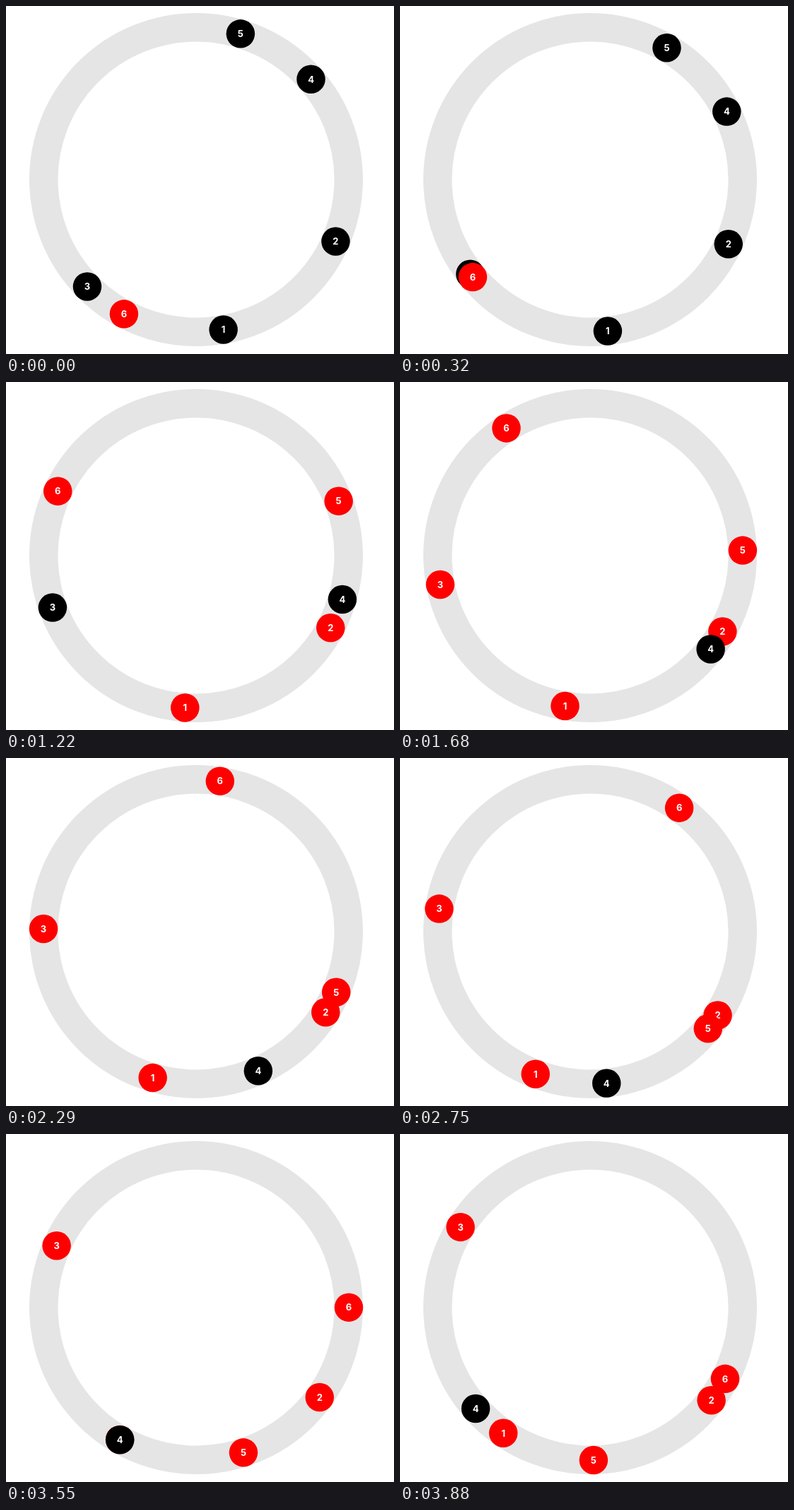
Animation of 549x493 px, one loop 3930 ms. Source, as an HTML page:

```html
<!DOCTYPE html>
<html lang="en">
<head>
<meta charset="utf-8">
<title>Runners on a ring</title>
<style>
  html, body { margin: 0; width: 100%; height: 100%; overflow: hidden; background: #fff; }
  svg { display: block; }
  text { font: bold 13px Inter, Arial, sans-serif; fill: #fff; text-anchor: middle; }
</style>
</head>
<body>
<svg id="stage" width="549" height="493" viewBox="0 0 549 493">
  <circle cx="269" cy="246" r="215.75" fill="none" stroke="#e5e5e5" stroke-width="40.5"/>
</svg>
<script>
const LOOP = 3930, TICK = 78, CX = 269, CY = 246, R = 216, GAP = 60;

// All runners start together at angle 0; speeds are degrees per race unit.
const speeds = [10, 3, 17, 40, 36, 60];

// Key points of the slightly uneven clock: milliseconds, race time.
const clock = [[0, 7.97], [620, 8.705], [1220, 9.417], [2290, 10.65], [3250, 11.719], [3880, 12.464]];

const stage = document.getElementById('stage');
const angle = (speed, time) => speed * time % 360;

// A runner turns red for good once its angle differs from all others by GAP.
function lonelyAt(speed) {
  const others = speeds.filter(s => s !== speed);
  const end = clock.at(-1)[1];
  for (let t = 0; t <= end; t += 0.005) {
    if (others.every(s => Math.abs(angle(s, t) - angle(speed, t)) >= GAP)) return t;
  }
  return Infinity;
}

function add(parent, tag, attrs = {}) {
  const el = document.createElementNS('http://www.w3.org/2000/svg', tag);
  for (const k in attrs) el.setAttribute(k, attrs[k]);
  return parent.appendChild(el);
}

const runners = speeds.map((speed, i) => {
  const g = add(stage, 'g');
  const disc = add(g, 'circle', { r: 20.25 });
  add(g, 'text', { y: 4.8 }).textContent = i + 1;
  return { g, disc, speed, redAt: lonelyAt(speed) };
});

// Race time, advancing in even ticks between key points.
function raceTime(ms) {
  const i = clock.findIndex(([t]) => t > ms);
  if (i < 0) return clock.at(-1)[1];
  const [t0, a] = clock[i - 1], [t1, b] = clock[i];
  const n = Math.round((t1 - t0) / TICK);
  return a + (b - a) * Math.floor(n * (ms - t0) / (t1 - t0)) / n;
}

function draw(ms) {
  const time = raceTime(ms);
  for (const { g, disc, speed, redAt } of runners) {
    const a = angle(speed, time) * Math.PI / 180;
    g.setAttribute('transform', `translate(${CX + R * Math.cos(a)} ${CY + R * Math.sin(a)})`);
    disc.setAttribute('fill', time >= redAt ? '#f00' : '#000');
  }
}

let start;
function frame(now) {
  start ??= now;
  draw(Math.max(0, now - start) % LOOP);
  requestAnimationFrame(frame);
}
draw(0);
requestAnimationFrame(frame);
</script>
</body>
</html>
```
